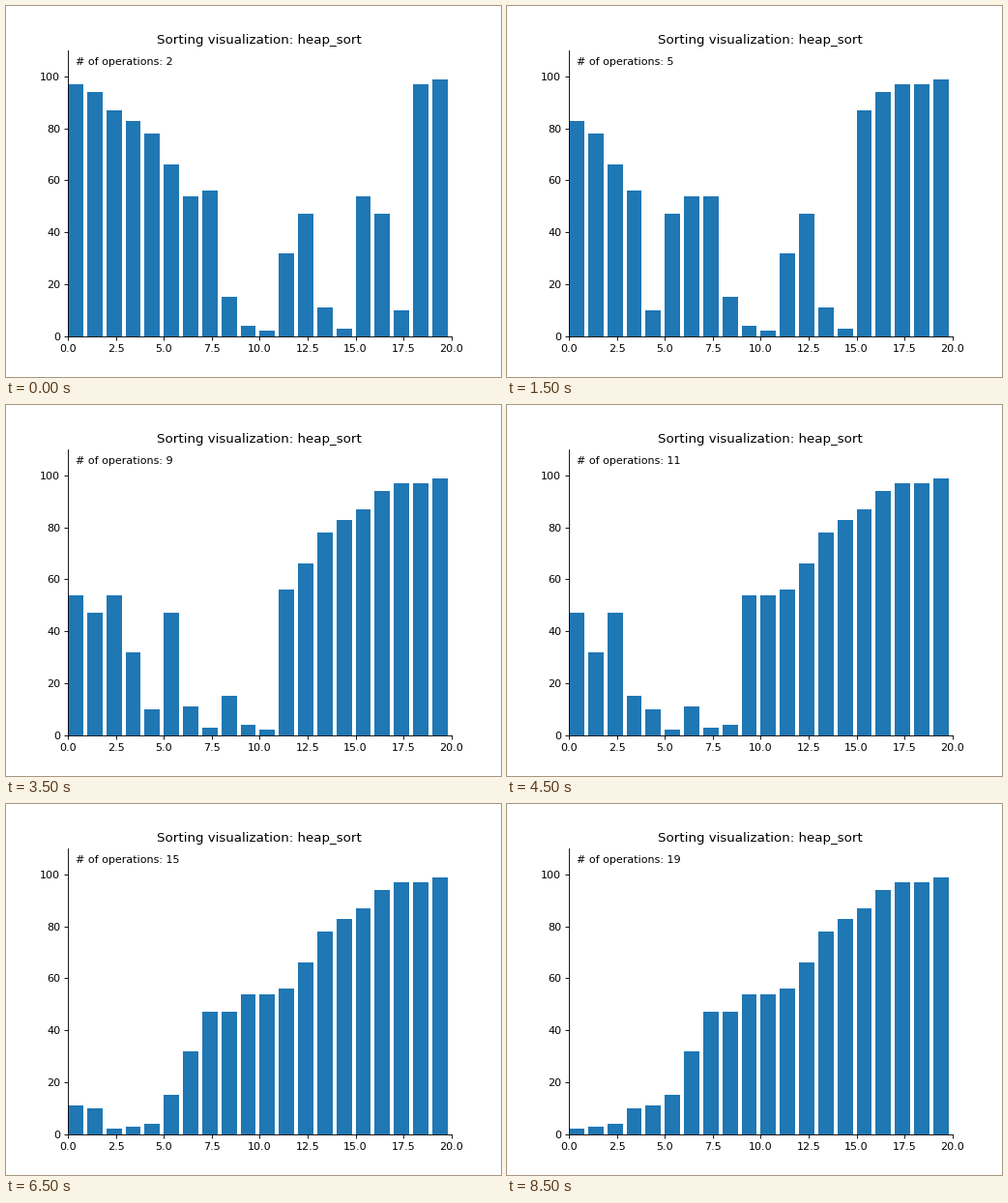
A matplotlib script for the animation above (9 s loop, 512 by 384 pixels).

```python
import matplotlib.pyplot as plt
from matplotlib.animation import FuncAnimation

HEAP = [97, 94, 87, 83, 78, 66, 54, 56, 15, 4,
        2, 32, 47, 11, 3, 54, 47, 10, 97, 99]
HEAP_SIZE = 18


def sift_down(a, size):
    """Restore the max-heap in a[:size] after its root was replaced."""
    i = 0
    while True:
        largest = i
        for child in (2 * i + 1, 2 * i + 2):
            if child < size and a[child] > a[largest]:
                largest = child
        if largest == i:
            return
        a[i], a[largest] = a[largest], a[i]
        i = largest


def heap_sort_states(values, size):
    """List the array after each extraction of the maximum."""
    a = list(values)
    states = [a[:]]
    for last in range(size - 1, 0, -1):
        a[0], a[last] = a[last], a[0]
        sift_down(a, last)
        states.append(a[:])
    return states


states = heap_sort_states(HEAP, HEAP_SIZE)
first_count = len(HEAP) - HEAP_SIZE

fig, ax = plt.subplots(figsize=(6.4, 4.8), dpi=80)
ax.set_title("Sorting visualization: heap_sort")
bars = ax.bar(range(len(HEAP)), HEAP, align="edge")
ax.set_xlim(0, len(HEAP))
ax.set_ylim(0, 110)
ax.spines[["top", "right"]].set_visible(False)
label = ax.text(0.02, 0.95, "", transform=ax.transAxes)


def update(step):
    for bar, value in zip(bars, states[step]):
        bar.set_height(value)
    label.set_text(f"# of operations: {step + first_count}")
    return [*bars, label]


def init():
    return update(0)


anim = FuncAnimation(fig, update, frames=len(states), init_func=init,
                     interval=500, repeat=True, repeat_delay=0, blit=False)
plt.show()
```
